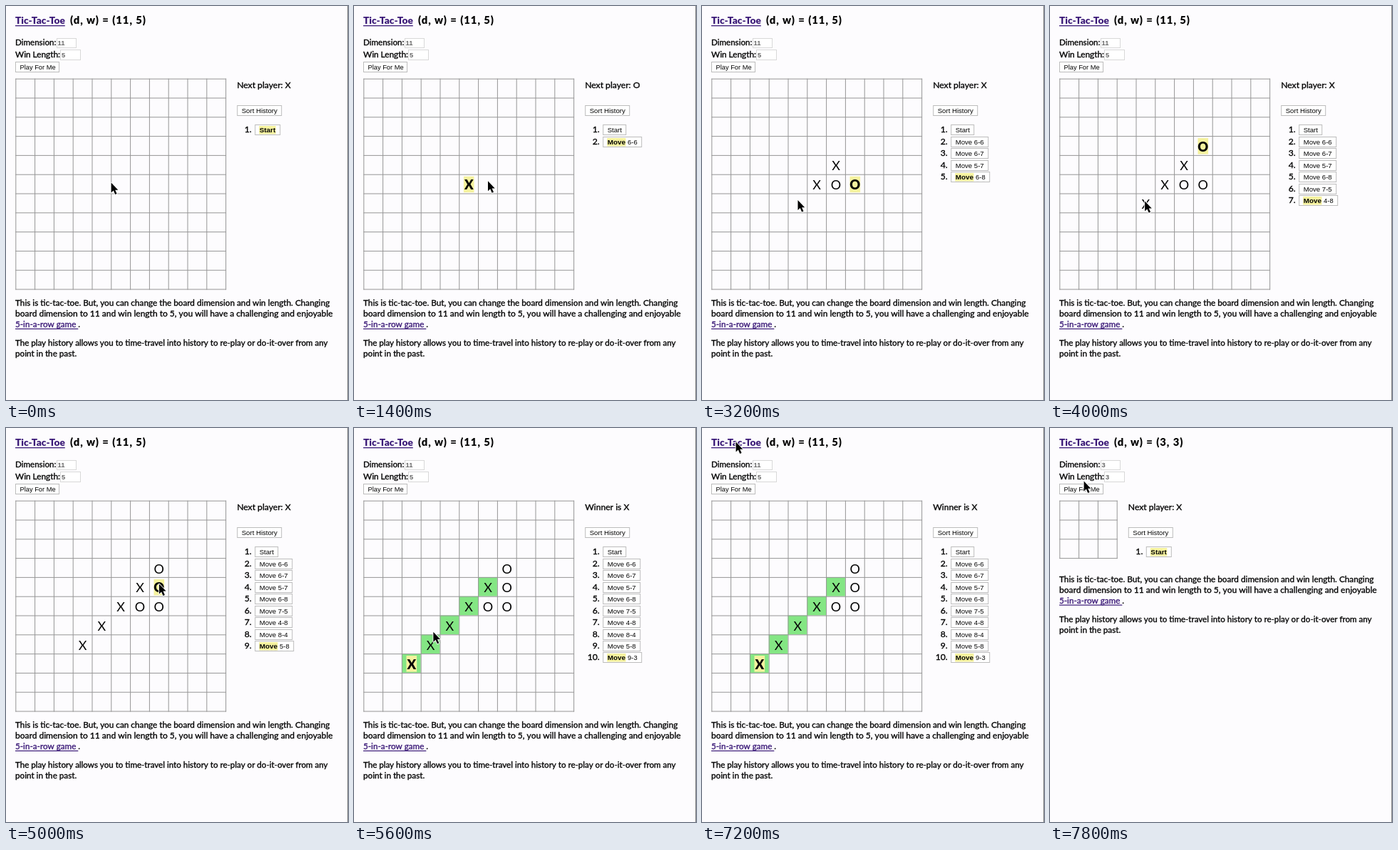
Recreate the animation shown at these times as an HTML page with a canvas. Size 480 px wide and 552 px high, loop 8000 ms.

```html
<!DOCTYPE html>
<html lang="en">
<head>
<meta charset="utf-8">
<title>Tic-Tac-Toe</title>
<style>
  html, body { margin: 0; width: 100%; height: 100%; overflow: hidden; background: #fdfcfe; }
  canvas { display: block; width: 480px; height: 552px; }
</style>
</head>
<body>
<canvas id="stage"></canvas>
<script>
const W = 480, H = 552, LOOP = 8000, STEP = 200, RESET = 7400;
const LEFT = 13.3, TOP = 101.7, CELL = 26.8, MARGIN = 13;
const INK = '#050505', LINK = '#3b1a78', YELLOW = '#f5f29e', GREEN = '#84e684';
const canvas = document.getElementById('stage');
const ctx = canvas.getContext('2d');
const ratio = window.devicePixelRatio || 1;
canvas.width = W * ratio;
canvas.height = H * ratio;

// Moves as row-column, X first, played at a steady pace
const MOVES = '6-6 6-7 5-7 6-8 7-5 4-8 8-4 5-8 9-3'.split(' ').map((place, i) => {
  const [row, col] = place.split('-');
  return { place, time: 1000 + 560 * i, x: LEFT + (col - 1) * CELL, y: TOP + (row - 1) * CELL };
});

// The pointer visits every played cell, then the title link
const STOPS = [
  { time: 0, x: 147, y: 247 },
  ...MOVES.map(m => ({ time: m.time, x: m.x + CELL / 2, y: m.y + 9 })),
  { time: 6400, x: 221, y: 141 },
  { time: 7200, x: 47, y: 19 },
  { time: 7800, x: 47, y: 74 }
];

const lato = (size, weight = 400) => `${weight} ${size}px Lato, sans-serif`;
const arial = (size, weight = 400) => `${weight} ${size}px "Liberation Sans", Arial, sans-serif`;

function text(str, x, y, font, color = INK, align = 'left', spacing = 0) {
  ctx.font = font;
  ctx.fillStyle = color;
  ctx.textAlign = align;
  ctx.letterSpacing = spacing + 'px';
  ctx.fillText(str, x, y);
  return ctx.measureText(str).width;
}

// Body text in a medium weight: regular with a hairline outline
function label(str, x, y, size, color = INK, align = 'left') {
  const width = text(str, x, y, lato(size), color, align);
  ctx.strokeStyle = color;
  ctx.lineWidth = 0.35;
  ctx.strokeText(str, x, y);
  return width;
}

function rect(x, y, w, h, color) {
  ctx.fillStyle = color;
  ctx.fillRect(x, y, w, h);
}

function frame(x, y, w, h, color) {
  rect(x, y, w, h, '#fff');
  ctx.strokeStyle = color;
  ctx.lineWidth = 1;
  ctx.strokeRect(x + 0.5, y + 0.5, w - 1, h - 1);
}

function button(caption, x, y, w, size = 9.6) {
  frame(x, y, w, 15, '#bcbcbc');
  text(caption, x + 6.5, y + 10.9, arial(size));
}

function currentButton(caption, rest, x, y, w) {
  frame(x, y, w, 15, '#bcbcbc');
  ctx.font = arial(9.9, 700);
  ctx.letterSpacing = '0px';
  const used = ctx.measureText(caption).width;
  rect(x + 6, y + 2, used + 1, 11.5, YELLOW);
  text(caption, x + 6.5, y + 10.9, arial(9.9, 700));
  text(rest, x + 7 + used, y + 10.9, arial(9.4));
}

function header(dim, win) {
  const w = text('Tic-Tac-Toe', MARGIN, 25.4, lato(13.7, 900), LINK);
  rect(MARGIN, 27, w, 1.3, LINK);
  text(`(d, w) = (${dim}, ${win})`, 90, 25.4, lato(14.8, 900), INK, 'left', 0.95);
  label('Dimension:', MARGIN, 55.4, 11.6);
  label('Win Length:', MARGIN, 71.8, 11.8);
  frame(71, 45, 28, 14, '#d8d8d8');
  frame(76, 61, 29, 15, '#d8d8d8');
  text(dim, 72.5, 55.3, arial(9.4, 700), '#666');
  text(win, 78, 71.8, arial(9.4, 700), '#666');
  button('Play For Me', MARGIN, 78, 62, 9.3);
}

function grid(n) {
  const size = n * CELL + 1;
  for (let i = 0; i <= n; i++) {
    rect(LEFT + i * CELL, TOP, 1, size, '#969696');
    rect(LEFT, TOP + i * CELL, size, 1, '#969696');
  }
}

function mark({ x, y }, isX, isLast, won) {
  const mid = x + CELL / 2 + 0.5;
  if (won && isX) rect(x, y, CELL, CELL, GREEN);
  if (isLast) rect(mid - 7.3, y + 3, 14.6, 22.5, YELLOW);
  text(isX ? 'X' : 'O', mid, y + 21.4, isLast ? lato(18.3, 900) : lato(18), INK, 'center');
}

function side(x, status, count) {
  label(status, x, 114.5, 12.15);
  button('Sort History', x, 139, 63);
  for (let i = 0; i <= count; i++) {
    const y = Math.round(166.4 + i * 16.45);
    const [word, place] = i ? ['Move', ' ' + MOVES[i - 1].place] : ['Start', ''];
    label(`${i + 1}.`, x + 20.5, y + 10.7, 12.2, INK, 'right');
    if (i === count) currentButton(word, place, x + 25, y, i ? 55 : 36);
    else button(word + place, x + 25, y, i ? 53 : 33);
  }
}

function notes(y) {
  label('This is tic-tac-toe. But, you can change the board dimension and win length. Changing', MARGIN, y, 11.77);
  label('board dimension to 11 and win length to 5, you will have a challenging and enjoyable', MARGIN, y + 15, 12.02);
  const w = label('5-in-a-row game ', MARGIN, y + 30, 11.7, LINK);
  rect(MARGIN, y + 31.5, w, 1.2, LINK);
  label('.', MARGIN + w, y + 30, 11.7);
  label('The play history allows you to time-travel into history to re-play or do-it-over from any', MARGIN, y + 55.5, 11.58);
  label('point in the past.', MARGIN, y + 70.5, 11.7);
}

// Rest briefly at each stop, then dart to the next one
function pointer(t) {
  const k = STOPS.findLastIndex(s => s.time <= t);
  const from = STOPS[k], to = STOPS[k + 1] || from;
  const f = Math.max(0, (t - from.time - 80) / (to.time - from.time - 80 || 1));
  const ease = to === from ? 0 : 1 - (1 - f) ** 5;
  ctx.save();
  ctx.translate(from.x + (to.x - from.x) * ease, from.y + (to.y - from.y) * ease);
  const arrow = new Path2D('M.6 .6V14.6L3.8 11.6L6.2 17L8.6 16L6.2 10.7H10.3Z');
  ctx.strokeStyle = '#fff';
  ctx.lineWidth = 1.8;
  ctx.lineJoin = 'round';
  ctx.stroke(arrow);
  ctx.fillStyle = '#000';
  ctx.fill(arrow);
  ctx.restore();
}

function draw(t) {
  ctx.setTransform(ratio, 0, 0, ratio, 0, 0);
  rect(0, 0, W, H, '#fdfcfe');
  rect(479, 0, 1, H, '#8c8c8c');
  const reset = t >= RESET;
  const dim = reset ? 3 : 11;
  const count = reset ? 0 : MOVES.filter(m => m.time <= t).length;
  const won = count === MOVES.length;
  const status = won ? 'Winner is X' : 'Next player: ' + (count % 2 ? 'O' : 'X');
  header(dim, reset ? 3 : 5);
  MOVES.slice(0, count).forEach((m, i) => mark(m, i % 2 === 0, i === count - 1, won));
  grid(dim);
  side(MARGIN + dim * CELL + 16.4, status, count);
  notes(reset ? 216 : 420.3);
  pointer(t);
}

const start = performance.now();
function tick() {
  const t = (performance.now() - start) % LOOP;
  draw(Math.floor(t / STEP) * STEP);
  requestAnimationFrame(tick);
}
tick();
</script>
</body>
</html>
```
